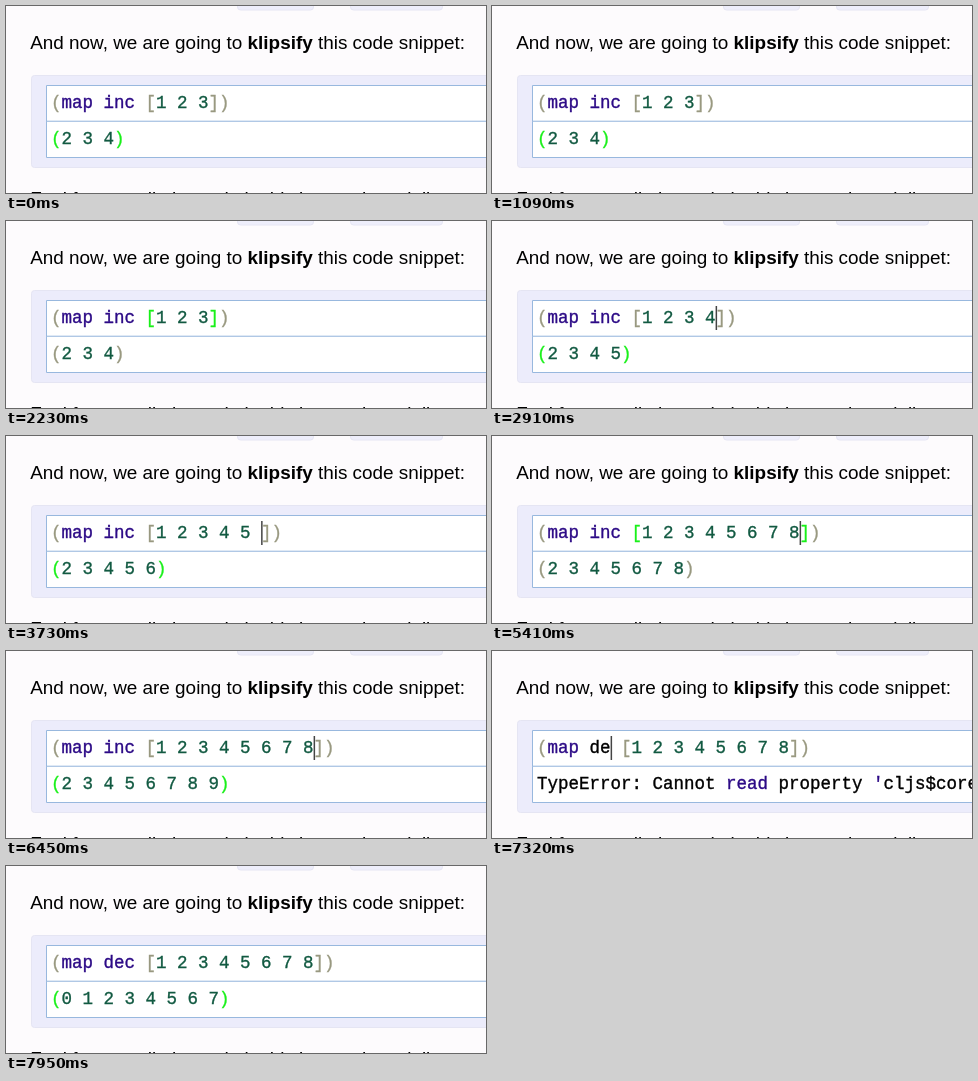
An HTML page with a canvas that plays this animation: 480x187 px, repeating every 8000 ms.

```html
<!DOCTYPE html>
<html lang="en">
<head>
<meta charset="utf-8">
<title>Live code snippet</title>
<style>
  html, body { margin: 0; width: 100%; height: 100%; overflow: hidden; background: #fdfbfd; }
  canvas { display: block; width: 480px; height: 187px; }
</style>
</head>
<body>
<canvas id="stage"></canvas>
<script>
const LOOP = 8000, EVAL_DELAY = 80, BLINK = 530;
const CODE_X = 45.1, CHAR_W = 10.5;
const MONO = '17.5px "Liberation Mono", monospace';
const SANS = '18.9px "Liberation Sans", sans-serif';
const BOLD = 'bold ' + SANS;
const ERROR = "TypeError: Cannot read property 'cljs$core$IFn' of undefined";

const canvas = document.getElementById('stage');
const ctx = canvas.getContext('2d');
const scale = window.devicePixelRatio || 1;
canvas.width = 480 * scale;
canvas.height = 187 * scale;
ctx.scale(scale, scale);

// Each action: time, function name, vector contents; clicks move the caret without evaluating.
const actions = [
  { time: -1000, name: 'inc', items: '1 2 3', caret: 'none' },
  { time: 1680, name: 'inc', items: '1 2 3', caret: 'items', click: true }
];
const typingTimes = [2400, 2620, 2950, 3270, 3550, 3900, 4110, 4760, 5050, 5350];
typingTimes.forEach((time, i) => actions.push({
  time, name: 'inc', items: '1 2 3' + ' 4 5 6 7 8'.slice(0, i + 1), caret: 'items'
}));
const allItems = '1 2 3 4 5 6 7 8';
actions.push({ time: 6600, name: 'inc', items: allItems, caret: 'name', click: true });
[[6820, 'in'], [6890, 'i'], [6960, ''], [7030, 'd'], [7210, 'de'], [7400, 'dec']]
  .forEach(([time, name]) => actions.push({ time, name, items: allItems, caret: 'name' }));

function evaluate({ name, items }) {
  const delta = { inc: 1, dec: -1 }[name];
  if (!delta) return ERROR;
  return '(' + items.trim().split(' ').map(n => +n + delta).join(' ') + ')';
}

function tokenColor(token, lit) {
  if (/^[()[\]]$/.test(token)) return lit.includes(token) ? '#1af01a' : '#999980';
  if (/^\d+$/.test(token)) return '#125a42';
  if (/^(map|inc|dec|read|')$/.test(token)) return '#2c0a86';
  return '#000';
}

// A hairline outline gives the code its heavier weight.
function drawCode(text, baseline, lit) {
  ctx.font = MONO;
  ctx.lineWidth = 0.35;
  for (const match of text.matchAll(/[\w$]+|\S/g)) {
    ctx.fillStyle = ctx.strokeStyle = tokenColor(match[0], lit);
    [...match[0]].forEach((char, i) => {
      const x = CODE_X + (match.index + i) * CHAR_W;
      ctx.fillText(char, x, baseline);
      ctx.strokeText(char, x, baseline);
    });
  }
}

function drawText(text, x, baseline, font = SANS) {
  ctx.font = font;
  ctx.fillStyle = '#000';
  ctx.fillText(text, x, baseline);
  return x + ctx.measureText(text).width;
}

function panel(x, y, w, h, fill, stroke, radius = 0) {
  ctx.beginPath();
  ctx.roundRect(x, y, w, h, radius);
  ctx.fillStyle = fill;
  ctx.fill();
  ctx.strokeStyle = stroke;
  ctx.lineWidth = 1;
  ctx.stroke();
}

function drawPage() {
  ctx.fillStyle = '#fdfbfd';
  ctx.fillRect(0, 0, 480, 187);

  panel(231.5, -20, 76, 24, '#eeeefb', '#e6e6f4', 3);
  panel(344.5, -20, 92, 24, '#eeeefb', '#e6e6f4', 3);
  drawText('(among', 24, -4);
  drawText('goggle', 238, -4, MONO);
  drawText('(page', 442, -4);

  let x = drawText('And now, we are going to ', 24.2, 43.2);
  x = drawText('klipsify', x, 43.2, BOLD);
  drawText(' this code snippet:', x, 43.2);
  drawText('Feel free to edit the code in this box and see it live', 24.2, 199);

  panel(25.5, 69.5, 480, 92, '#ececfb', '#e5e5f3', 3);
  panel(40.5, 79.5, 480, 36, '#fff', '#98b8de');
  panel(40.5, 115.2, 480, 36.3, '#fff', '#98b8de');
}

function draw(now) {
  const latest = actions.findLast(a => a.time <= now);
  const evaluated = actions.findLast((a, i) => {
    const done = a.time + EVAL_DELAY;
    return done <= now && (i + 1 === actions.length || actions[i + 1].time >= done);
  });
  const outputLit = evaluated === latest && !latest.click;
  const inputLit = !outputLit && latest.caret === 'items';

  drawPage();
  drawCode(`(map ${latest.name} [${latest.items}])`, 102, inputLit ? '[]' : '');
  drawCode(evaluate(evaluated), 138.4, outputLit ? '()' : '');

  const caretOn = Math.floor((now - latest.time) / BLINK) % 2 === 0;
  if (latest.caret !== 'none' && caretOn) {
    const column = 5 + latest.name.length + (latest.caret === 'items' ? 2 + latest.items.length : 0);
    ctx.fillStyle = '#444';
    ctx.fillRect(CODE_X + column * CHAR_W, 85, 1.5, 24);
  }
}

function frame() {
  draw(performance.now() % LOOP);
  requestAnimationFrame(frame);
}
frame();
</script>
</body>
</html>
```
